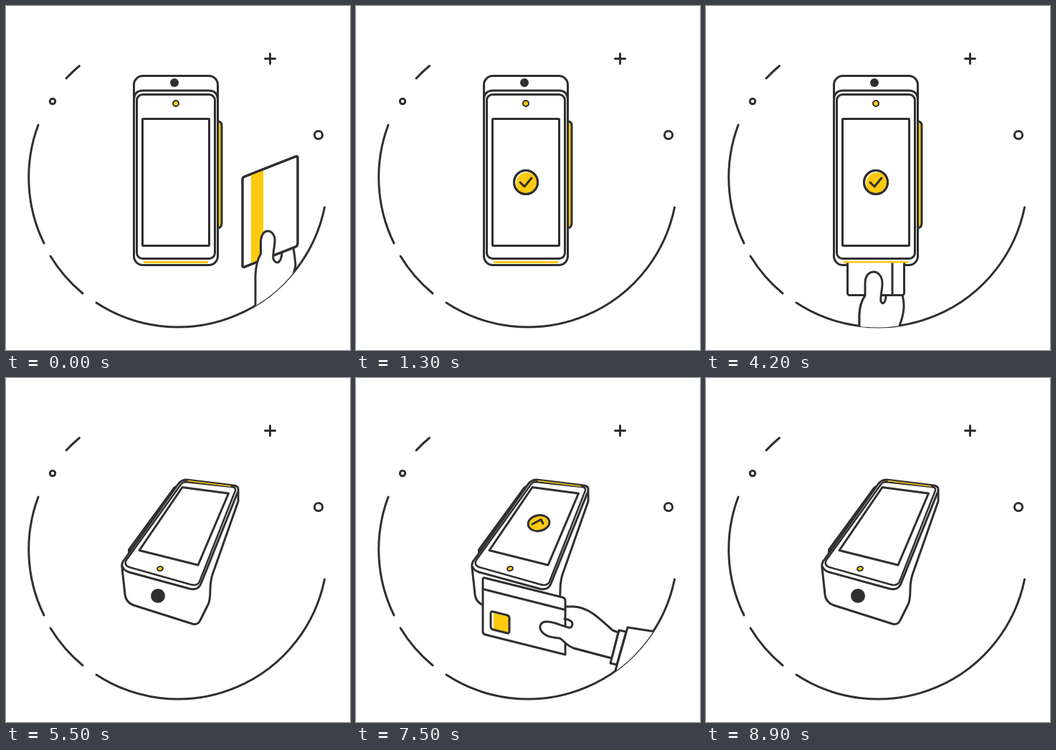
Write an HTML page that moves like this. It is 480 px wide and 480 px high and loops after 9 s.

```html
<!DOCTYPE html>
<html lang="en">
<head>
<meta charset="utf-8">
<title>Card terminal</title>
<style>
  html, body { margin: 0; width: 100%; height: 100%; overflow: hidden; background: #fff; }
  svg { display: block; width: 100vw; height: 100vh; }
  .ink { fill: #fff; stroke: #2f2f30; stroke-width: 3; stroke-linecap: round; stroke-linejoin: round; }
  .line { fill: none; }
  .gold { fill: #ffca10; }
  .flat { stroke: none; }
  .dark { fill: #2f2f30; stroke: none; }
  .goldline { fill: none; stroke: #ffca10; stroke-linecap: butt; }
</style>
</head>
<body>
<svg viewBox="0 0 480 480" class="ink">
  <defs>
    <clipPath id="disc"><circle cx="240" cy="240" r="208.5"/></clipPath>
    <clipPath id="belowSlot"><rect y="358.5" width="480" height="122"/></clipPath>
  </defs>

  <g class="line">
    <path d="M45 166A208.5 208.5 0 0 0 53 331M62 349A208.5 208.5 0 0 0 107 401
             M126 414A208.5 208.5 0 0 0 444.5 281M84 101A208.5 208.5 0 0 1 102.5 83.5"/>
    <circle cx="65" cy="133" r="3.7"/>
    <circle cx="436" cy="180" r="5.6"/>
    <path d="M361.5 73.5h14M368.5 66.5v14"/>
  </g>

  <g id="front">
    <g clip-path="url(#disc)">
      <g id="swipe">
        <path class="flat" d="M348 424V374Q349 356 356 346L401 337Q403 350 404 361C402 376 394 395 384 414V424Z"/>
        <path class="line" d="M401 337Q403 350 404 361C402 376 394 395 384 414V424"/>
        <path d="M330 242q0-3 3-4L404 210q3-1 3 1V331q0 4-3 5L333 364q-3 1-3-1Z"/>
        <path class="gold flat" d="M342 235.5L359 229V352L342 358.5Z"/>
        <path class="line" d="M330 242q0-3 3-4L404 210q3-1 3 1V331q0 4-3 5L333 364q-3 1-3-1Z"/>
        <path d="M348 424V376Q349 356 355.500 346V330C355.500 320 360 314 365 314C371 314 376 320 375 330C374 340 372 347 373 353Q375 358 379 358Q384 356 385 345"/>
        <rect x="342.500" y="427.500" width="47" height="9"/>
        <path d="M335 437H397L404 523.500H329.500Z"/>
      </g>
    </g>

    <path class="gold" d="M295.500 161q5.500 0 5.500 6V303q0 6-5.500 7"/>
    <rect x="178.500" y="97.500" width="117" height="264" rx="12.500"/>
    <path class="line" d="M178.500 131Q179 118 191 118H283Q295 118 295.500 131"/>
    <rect x="182.500" y="123.500" width="109" height="229" rx="8"/>
    <rect x="190.500" y="157.500" width="93" height="177" rx="1"/>
    <circle class="gold" cx="237" cy="136" r="4" stroke-width="2"/>
    <circle class="dark" cx="235" cy="107" r="6"/>
    <path class="goldline" d="M192 357.500H282"/>

    <g clip-path="url(#disc)"><g clip-path="url(#belowSlot)">
      <g id="dock">
        <path d="M214 470V432Q214 416 222 404L274 403C278 418 276 430 270 446L264 470"/>
        <rect x="197.500" y="279" width="79" height="124.500" rx="3"/>
        <path class="line" d="M260 280V403"/>
        <path d="M214 470V432Q214 416 222 404V387C222 377 227 371 234 371C241 371 246 378 246 387C246 397 243 405 244 412Q246 417 249 413Q251 410 251 404"/>
      </g>
    </g></g>

    <g id="frontCheck">
      <circle cx="237" cy="246" r="16.500"/>
      <circle class="gold flat" cx="238.300" cy="247.300" r="15"/>
      <path class="line" d="M229 246l6 6 10-12"/>
      <circle class="line" cx="237" cy="246" r="16.500"/>
    </g>
  </g>

  <g id="tilted">
    <path class="dark" d="M170 244V239L233 153q2-3 7-3l3 2L174 245Z"/>
    <path class="goldline" stroke-width="1.200" d="M175 238L237 153"/>
    <path d="M162 265L166 302Q167 313 178 317L260 343Q268 345 271 338L281 318Q285 312 285 295Q285 280 291 266L324 172V155Q324 151 318 150L252 142Q245 142 241 147L164 255Q161 259 162 265Z"/>
    <path class="line" d="M163 264Q165 269 172 271L256 294Q268 297 272 287L323 160"/>
    <path stroke-width="2.500" d="M243 150L168 254Q164 261 172 264L257 288Q267 291 270 284L320 157Q321 153 316 152L251 145Q246 145 243 150Z"/>
    <path d="M246 152.500L310.500 161L268 261L186 240.500Z"/>
    <path class="goldline" stroke-width="1.500" d="M254 143.500L314 151"/>
    <ellipse class="gold" cx="215" cy="266" rx="4" ry="3" stroke-width="2" transform="rotate(-15 215 266)"/>
    <circle class="dark" cx="212" cy="304" r="10"/>

    <g clip-path="url(#disc)">
      <g id="insert">
        <path d="M290 319H304C325 320 340 336 358 352L366 355L357 391L304 377L290 360Z"/>
        <path d="M177 281q0-3 3-2L288 306q4 1 4 5V386L180 358q-3-1-3-4Z"/>
        <path class="line" d="M177 294.500L292 323.500"/>
        <path class="gold flat" d="M192 328L213 333V356L192 351Z"/>
        <path class="line" d="M191 326L211 331q3 1 3 4V353q0 4-3 3L191 351q-3-1-3-4V329q0-4 3-3Z"/>
        <path d="M291 336Q302 338 302 343Q302 349 296 348C285 345 276 340 266 340C258 340 255 346 258 352C264 362 276 362 284 363C290 366 294 374 304 377L357 391"/>
        <path d="M367 352L377 354L364 400L355 398Z"/>
        <path d="M379 348L450 359L430 425L362 408Z"/>
      </g>
    </g>

    <g id="tiltedCheck">
      <ellipse class="gold" cx="255" cy="202.500" rx="15" ry="11" transform="rotate(-10 255 202.500)"/>
      <path class="line" d="M246 204L258 197.500L261 203"/>
    </g>
  </g>
</svg>
<script>
const LOOP = 9000, STEP = 100;
const el = id => document.getElementById(id);
const ramp = (t, from, to) => Math.min(1, Math.max(0, (t - from) / (to - from)));
const move = (id, x, y) => el(id).setAttribute('transform', `translate(${x} ${y})`);
const show = (id, on) => el(id).setAttribute('visibility', on ? 'inherit' : 'hidden');
// Fades in over two steps, then cuts off.
const flash = (t, from, until) => t < until ? ramp(t, from, from + 200) : 0;

function draw(t) {
  const isFront = t < 5500;
  show('front', isFront);
  show('tilted', !isFront);

  const lift = ramp(t, 400, 800), drop = ramp(t, 800, 1200);
  show('swipe', isFront && t < 1200);
  move('swipe', -27 * lift - 6 * drop, -173 * lift + 403 * drop);

  const undocked = 1 - ramp(t, 2700, 3100) + ramp(t, 5100, 5500);
  move('dock', 0, 175 * undocked);

  const away = 1 - ramp(t, 5900, 6400) + ramp(t, 8400, 8900);
  move('insert', 235 * away, 105 * away);

  el('frontCheck').setAttribute('opacity', flash(t, 1100, 2300) + (t > 2300 ? flash(t, 4000, 5200) : 0));
  el('tiltedCheck').setAttribute('opacity', flash(t, 7300, 8500));
}

const start = performance.now();
function tick() {
  const t = (performance.now() - start) % LOOP;
  draw(Math.floor(t / STEP) * STEP);
  requestAnimationFrame(tick);
}
tick();
</script>
</body>
</html>
```
